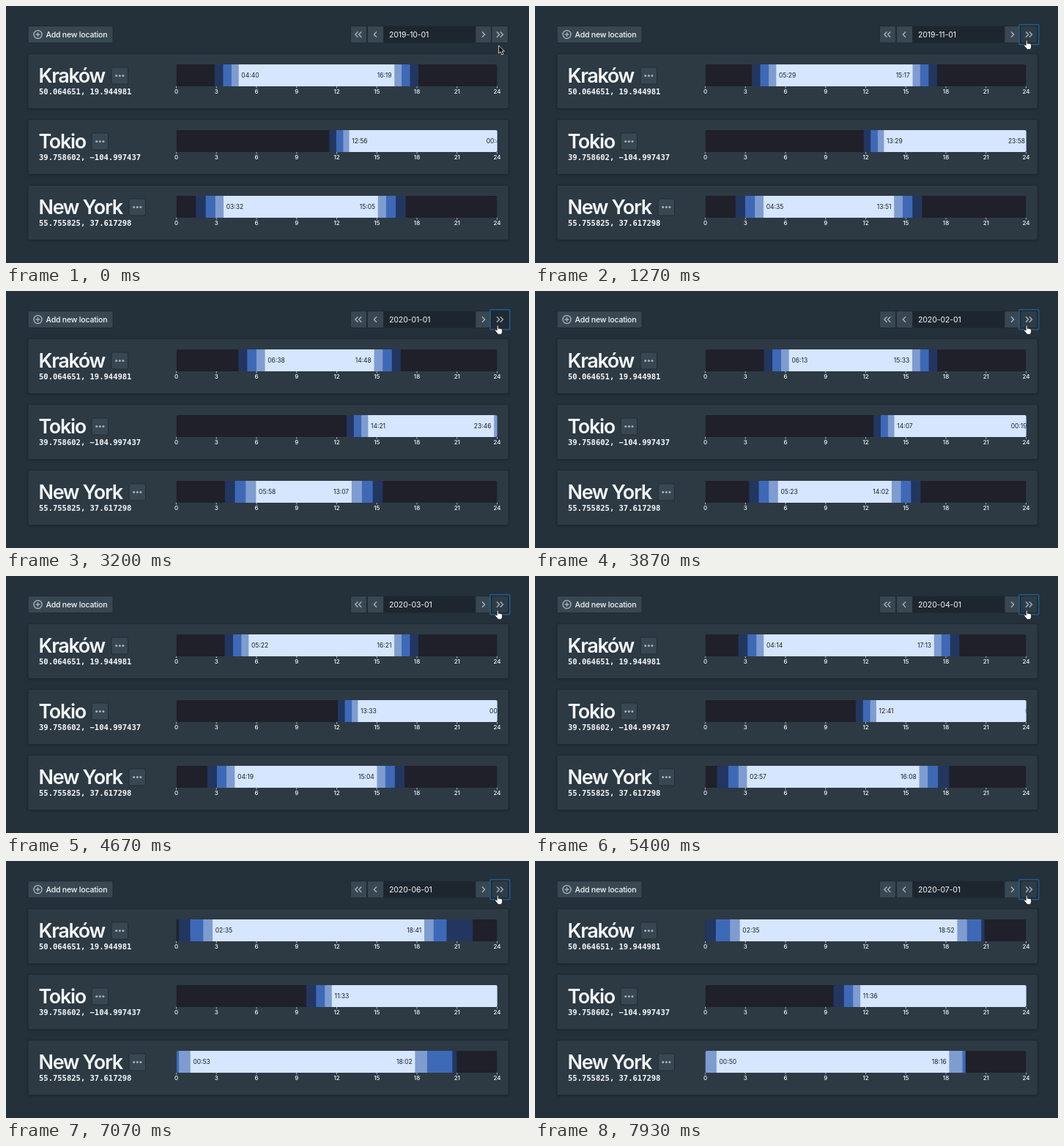
An HTML page for the animation above (8000 ms loop, 714 px wide and 352 px high).

```html
<!DOCTYPE html>
<html lang="en">
<head>
<meta charset="utf-8">
<title>Daylight by location</title>
<style>
  html, body { margin: 0; width: 100%; height: 100%; overflow: hidden; background: #24303a; }
  svg { display: block; }
  text { font-family: Inter, "Open Sans", sans-serif; fill: #f5f8fa; }
  .ui { font-size: 10.5px; font-weight: 500; letter-spacing: -.2px; }
  .date { font-size: 10.5px; letter-spacing: -.1px; }
  .name { font-size: 27px; font-weight: 600; letter-spacing: -1.35px; }
  .coords { font: bold 10.5px "DejaVu Sans Mono", monospace; }
  .hour { font-size: 8px; font-weight: 500; text-anchor: middle; }
  .time { font-size: 8.5px; fill: #182026; }
  .end { text-anchor: end; }
  .button { fill: #384752; stroke: #1d272f; stroke-width: .8; }
  .icon { fill: none; stroke: #a3b2be; stroke-width: 1.4; }
  .card { fill: #2d3a44; stroke: #1f2932; stroke-width: .8; filter: drop-shadow(0 1px 1.5px #10161a66); }
</style>
</head>
<body>
<svg id="stage" width="714" height="352" viewBox="0 0 714 352">
  <defs><clipPath id="bar"><rect width="438" height="30" rx="2"/></clipPath></defs>
  <rect class="button" x="30" y="27.5" width="116" height="23" rx="2"/>
  <path class="icon" d="M38 39a5.5 5.5 0 1 0 11 0a5.5 5.5 0 1 0 -11 0M40.6 39h5.8M43.5 36.1v5.8"/>
  <text class="ui" x="54.5" y="42.8">Add new location</text>
  <rect class="button" x="470.5" y="27.5" width="22" height="23" rx="2"/>
  <rect class="button" x="493.5" y="27.5" width="22" height="23"/>
  <rect x="516" y="27.5" width="124.5" height="23" fill="#1d262e"/>
  <rect class="button" x="641" y="27.5" width="21.5" height="23"/>
  <rect class="button" id="next" x="663" y="27.5" width="22.5" height="23" rx="2"/>
  <path class="icon" d="M480.5 35.3l-3.6 3.7l3.6 3.7M485.3 35.3l-3.6 3.7l3.6 3.7M506 35.3l-3.6 3.7l3.6 3.7
    M650 35.3l3.6 3.7l-3.6 3.7M670 35.3l3.6 3.7l-3.6 3.7M674.8 35.3l3.6 3.7l-3.6 3.7"/>
  <text class="date" id="date" x="523" y="42.8"></text>
  <rect id="ring" x="660.8" y="25.4" width="27" height="27.4" rx="1" fill="none" stroke="#1f5c8a" stroke-width="1.5"/>
  <g id="rows"></g>
  <path id="arrow" d="M672.6 54v11l2.5-2.3l1.8 4l2-.9l-1.8-3.9h3.3z" fill="#111" stroke="#ddd" stroke-width=".9"/>
  <path id="hand" d="M3.2 7.6V1.6q0-1.2 1-1.2t1 1.2V5q.9-.8 1.9.1q1-.6 1.8.3q1.6-.3 1.7 1.2V9q0 1.8-1.1 3.2V13H4.2v-.8L.8 8.2q-.5-1 .3-1.5t2.1.9z"
    fill="#fff" stroke="#111" stroke-width=".8"/>
</svg>
<script>
const PERIOD = 8000;
const HOUR = 18.25;                                  // pixels per hour
const CLICKS = [1050, 1910, 2665, 3570, 4313, 5120, 6040, 6840, 7640];
const COLORS = ['#22365f', '#3e69b7', '#7e9ccf', '#d6e6ff'];
const ANGLES = [-.833, -6, -12, -18];                // sunrise, then civil, nautical, astronomical twilight
const RAD = Math.PI / 180;

// Sunrise and sunset on the first of each month, from October on
const places = [
  { name: 'Kraków', lat: 50.064651, coords: '50.064651, 19.944981', menu: 144,
    sun: '04:40 16:19 05:29 15:17 06:17 14:41 06:38 14:48 06:13 15:33 05:22 16:21 04:14 17:13 03:14 18:00 02:35 18:41 02:35 18:52' },
  { name: 'Tokio', lat: 39.758602, coords: '39.758602, −104.997437', menu: 117,
    sun: '12:56 00:42 13:29 23:58 14:02 23:36 14:21 23:46 14:07 00:19 13:33 00:51 12:41 01:24 11:58 01:55 11:33 02:21 11:36 02:31' },
  { name: 'New York', lat: 55.755825, coords: '55.755825, 37.617298', menu: 168,
    sun: '03:32 15:05 04:35 13:51 05:35 13:02 05:58 13:07 05:23 14:02 04:19 15:04 02:57 16:08 01:44 17:09 00:53 18:02 00:50 18:16' }
];

const $ = id => document.getElementById(id);
const show = (el, on) => el.setAttribute('visibility', on ? 'visible' : 'hidden');
const toHours = s => +s.slice(0, 2) + s.slice(3) / 60;

// Start and end hour of each layer, outermost first
function layers(lat, rise, set) {
  const r = toHours(rise);
  let s = toHours(set);
  if (s < r) s += 24;
  const noon = (r + s) / 2;
  const sinLat = Math.sin(lat * RAD), cosLat = Math.cos(lat * RAD);
  const y = cosLat * Math.cos((s - r) * 7.5 * RAD);
  const decl = Math.asin(Math.sin(ANGLES[0] * RAD) / Math.hypot(sinLat, y)) - Math.atan2(y, sinLat);
  let end = s;
  return ANGLES.map(angle => {
    const c = (Math.sin(angle * RAD) - sinLat * Math.sin(decl)) / (cosLat * Math.cos(decl));
    if (c < -1.01) return [0, end];                  // the sun never sinks this low
    const half = Math.acos(Math.max(-1, c)) / RAD / 15;
    end = noon + half;
    return [Math.max(0, noon - half), end];
  }).reverse();
}

places.forEach((p, i) => {
  const times = p.sun.split(' ');
  p.days = [];
  for (let k = 0; k < times.length; k += 2) {
    p.days.push({ rise: times[k], set: times[k + 1], spans: layers(p.lat, times[k], times[k + 1]) });
  }
  const row = document.createElementNS('http://www.w3.org/2000/svg', 'g');
  row.setAttribute('transform', `translate(0 ${65 + 90 * i})`);
  let axis = '';
  for (let h = 0; h <= 24; h += 3) {
    const x = 232.5 + h * HOUR;
    axis += `<path d="M${x} 45v2.5" stroke="#cdd5db" stroke-width=".8"/><text class="hour" x="${x}" y="55">${h}</text>`;
  }
  row.innerHTML = `
    <rect class="card" x="30" y=".5" width="656" height="75" rx="2"/>
    <text class="name" x="44.5" y="39.8">${p.name}</text>
    <text class="coords" x="45" y="56">${p.coords}</text>
    <rect class="button" x="${p.menu}" y="19" width="22.5" height="23" rx="2"/>
    ${[6.7, 11.3, 15.9].map(x => `<circle cx="${p.menu + x}" cy="30.5" r="1.5" fill="#a3b2be"/>`).join('')}
    ${axis}
    <g transform="translate(232.5 15)" clip-path="url(#bar)">
      <rect width="438" height="30" fill="#1f2029"/>
      ${COLORS.map(c => `<rect class="layer" height="30" fill="${c}"/>`).join('')}
      <text class="time" y="18.2"></text><text class="time end" y="18.2"></text>
    </g>`;
  $('rows').append(row);
  p.rects = row.querySelectorAll('.layer');
  p.labels = row.querySelectorAll('.time');
});

function drawRow(p, month, progress) {
  const day = p.days[month], last = p.days[Math.max(0, month - 1)];
  const mix = (j, side) => {
    const a = last.spans[j][side];
    return HOUR * (a + (day.spans[j][side] - a) * progress);
  };
  p.rects.forEach((rect, j) => {
    const x = mix(j, 0);
    rect.setAttribute('x', x);
    rect.setAttribute('width', Math.max(0, mix(j, 1) - x));
  });
  p.labels[0].textContent = day.rise;
  p.labels[1].textContent = day.set;
  p.labels[0].setAttribute('x', mix(3, 0) + 3.7);
  p.labels[1].setAttribute('x', mix(3, 1) - 3.7);
}

function draw(t) {
  const month = CLICKS.filter(c => c <= t).length;
  const since = month ? t - CLICKS[month - 1] : 0;
  const s = .013 * since;
  const progress = 1 - (1 + s) * Math.exp(-s);       // critically damped spring
  places.forEach(p => drawRow(p, month, progress));

  const date = new Date(Date.UTC(2019, 9 + month, 1));
  $('date').textContent = date.toISOString().slice(0, 10);

  const hover = t >= 66;
  const pressed = month ? since > 440 : t >= 930;
  $('next').style.fill = pressed ? '#1f2a33' : hover ? '#2e3c47' : '';
  show($('ring'), t >= 930);
  show($('arrow'), !hover);
  show($('hand'), hover);
  const y = 50 - [130, 270, 470, 670].filter(m => m <= t).length;
  $('hand').setAttribute('transform', `translate(667 ${y + .4})`);
}

function tick() {
  draw(performance.now() % PERIOD);
  requestAnimationFrame(tick);
}
tick();
</script>
</body>
</html>
```
